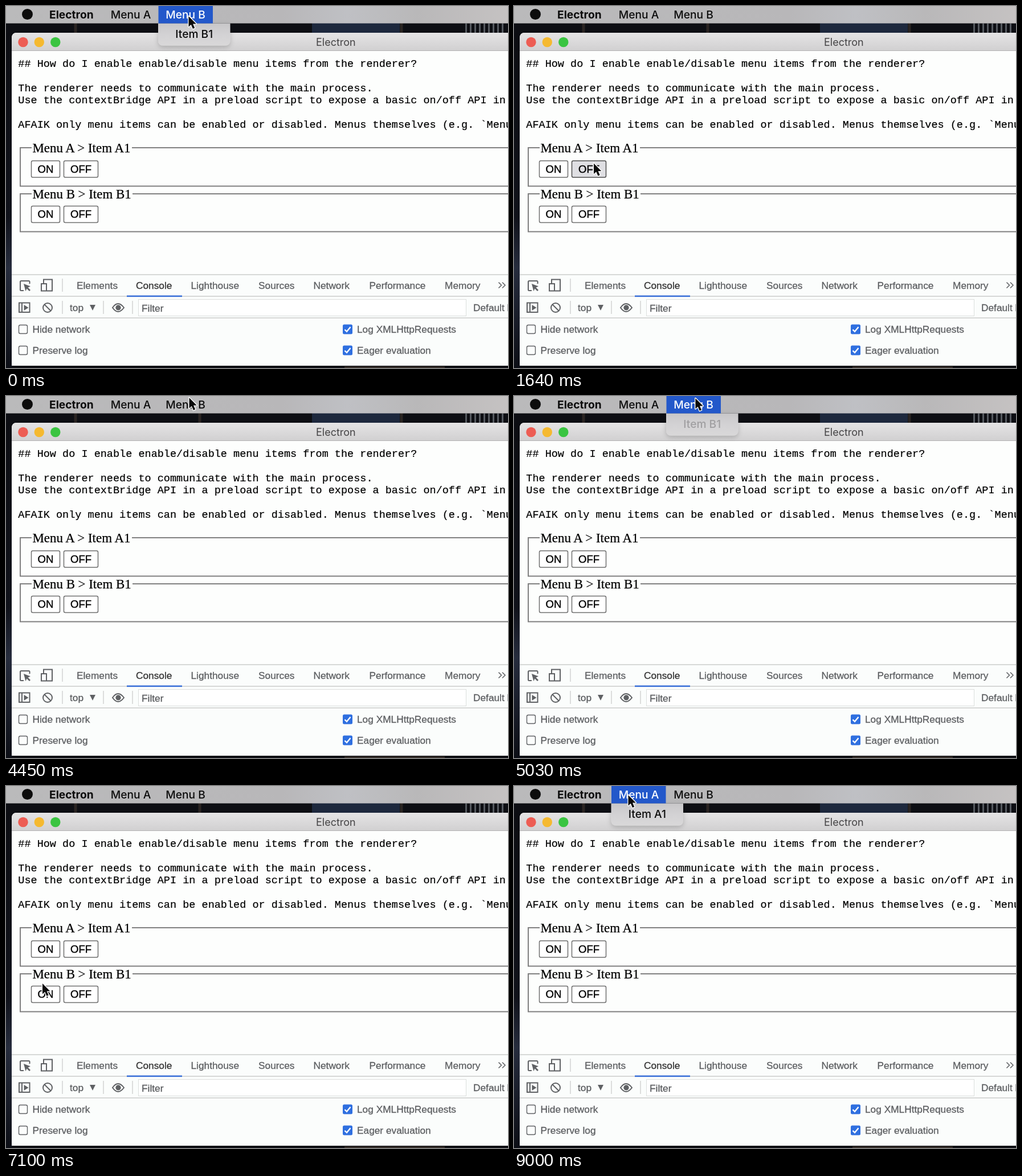
Write an HTML page that moves like this. It is 881 px wide and 636 px high and loops after 9.1 s.

```html
<!DOCTYPE html>
<html lang="en">
<head>
<meta charset="utf-8">
<title>Menu items</title>
<style>
  html, body { margin: 0; width: 100%; height: 100%; overflow: hidden; background: #0d0e13; }
  svg { display: block; width: 881px; height: 636px; }
  text { white-space: pre; }
  .bar { font: 500 19.2px Inter, sans-serif; fill: #0c0c0c; }
  .bold { font-weight: 700; }
  .title { font: 18px Inter, sans-serif; fill: #454446; }
  .mono { font: 18.53px "Liberation Mono", monospace; fill: #000; stroke: #000; stroke-width: .2; }
  .legend { font: 22.9px "Liberation Serif", serif; font-kerning: normal; fill: #000; stroke: #000; stroke-width: .25; }
  .tool { font: 17.3px "Liberation Sans", sans-serif; fill: #5c5e61; stroke: #5c5e61; stroke-width: .3; }
  .tool .active { fill: #333; stroke: #333; }
  .btn rect { fill: #fff; stroke: #6f6f6f; stroke-width: 1.5; }
  .btn text { font: 18.53px "Liberation Sans", sans-serif; text-anchor: middle; stroke: #000; stroke-width: .4; }
  .btn.hover rect { fill: #dfdfe3; stroke: #4e4e4e; }
  .icon { fill: none; stroke: #5f6164; stroke-width: 2; }
  .solid { fill: #5f6164; stroke: none; }
  .line { stroke: #cbcdcc; stroke-width: 1.3; }
  .menu .drop { display: none; }
  .menu.open .drop { display: inline; }
  .menu .lit { fill: none; }
  .menu.open .lit { fill: #2358ca; }
  .menu.open .name { fill: #fff; }
  .menu.off .item { fill: #a09fa1; }
  .field { fill: none; stroke: #808080; stroke-width: 2; }
</style>
</head>
<body>
<svg viewBox="0 0 881 636">
  <defs>
    <linearGradient id="barFill">
      <stop offset="0" stop-color="#bababb"/>
      <stop offset=".55" stop-color="#b8b7b9"/>
      <stop offset=".68" stop-color="#bfc0c4"/>
      <stop offset=".82" stop-color="#b9b8b9"/>
      <stop offset="1" stop-color="#c5c2c2"/>
    </linearGradient>
    <linearGradient id="titleFill" x2="0" y2="1">
      <stop offset="0" stop-color="#e5e4e5"/>
      <stop offset="1" stop-color="#d1d0d1"/>
    </linearGradient>
    <linearGradient id="dropFill" x2="0" y2="1">
      <stop offset="0" stop-color="#c8c7c9"/>
      <stop offset=".5" stop-color="#d3d2d4"/>
      <stop offset="1" stop-color="#d9d8d9"/>
    </linearGradient>
    <linearGradient id="edgeFill" x2="0" y2="1">
      <stop offset="0" stop-color="#0c0d12"/>
      <stop offset=".55" stop-color="#10121a"/>
      <stop offset=".7" stop-color="#262c3d"/>
      <stop offset="1" stop-color="#0c0e15"/>
    </linearGradient>
    <filter id="soft" x="-20%" y="-20%" width="140%" height="160%">
      <feDropShadow dx="0" dy="3" stdDeviation="4" flood-opacity=".2"/>
    </filter>
  </defs>

  <!-- desktop -->
  <rect width="881" height="636" fill="#0d0e13"/>
  <rect y="48" width="11" height="588" fill="url(#edgeFill)"/>
  <rect x="537" y="30" width="154" height="18" fill="#1d283d"/>
  <path d="M122 30v18M340 30v18M694 30v18" stroke="#2a2422" stroke-width="5"/>
  <path d="M806 39H874" stroke="#565a60" stroke-width="17" stroke-dasharray="3 5"/>
  <path d="M594 634.5H770" stroke="#41362f" stroke-width="2"/>

  <!-- window -->
  <path d="M10 632V56q0-9 9-9H881V632Z" fill="#fdfefd"/>
  <path d="M10 78V56q0-9 9-9H881V78Z" fill="url(#titleFill)"/>
  <path d="M10 78.5H881" stroke="#b3b2b3"/>
  <circle cx="30" cy="63.5" r="8.7" fill="#ed5d54"/>
  <circle cx="58.3" cy="63.5" r="8.7" fill="#f5b930"/>
  <circle cx="86.8" cy="63.5" r="8.7" fill="#3ac441"/>
  <text class="title" x="544" y="70">Electron</text>

  <g class="mono">
    <text x="21.3" y="107">## How do I enable enable/disable menu items from the renderer?</text>
    <text x="21.3" y="150">The renderer needs to communicate with the main process.</text>
    <text x="21.3" y="171.4">Use the contextBridge API in a preload script to expose a basic on/off API in</text>
    <text x="21.3" y="214">AFAIK only menu items can be enabled or disabled. Menus themselves (e.g. `Menu A`)</text>
  </g>

  <path class="field" d="M45 249H25V316.500H890M221 249H890"/>
  <path class="field" d="M45 330H25V396.500H890M222 330H890"/>
  <text class="legend" x="46.5" y="257">Menu A &gt; Item A1</text>
  <text class="legend" x="46.5" y="338">Menu B &gt; Item B1</text>
  <g id="buttons"></g>

  <!-- developer tools -->
  <rect x="10" y="472" width="871" height="160" fill="#fbfdfc"/>
  <path class="line" d="M10 472H881M10 510H881M10 548H881M99 479V502M99 518V541M171 518V541M222 518V541"/>
  <rect x="212" y="508.5" width="97" height="2.6" fill="#3a70d8"/>
  <rect x="232.5" y="515.5" width="575" height="29" fill="#fff" stroke="#dcdedd"/>

  <g class="icon">
    <path d="M31 500H26.500q-1.500 0-1.500-1.500V484.500q0-1.500 1.500-1.500H40q1.500 0 1.500 1.500V488"/>
    <path class="solid" d="M31 488l12 4.500-4.500 2 4.500 4.500-2 2-4.500-4.500-2 4.500Z"/>
    <path d="M66 487V480.500H81V500.500H72"/>
    <rect x="62" y="488" width="9" height="12.500"/>
    <rect x="23" y="521.500" width="18.500" height="16.500"/>
    <path d="M28 521V538"/>
    <path class="solid" d="M31.500 525l8 5-8 5Z"/>
    <circle cx="73" cy="530" r="8"/>
    <path d="M67.500 524.500l11 11"/>
    <path class="solid" d="M147 525H157L152 535Z"/>
    <path d="M187 530q9.500-14 20 0q-10.500 14-20 0Z"/>
    <circle class="solid" cx="197" cy="530" r="4.700"/>
    <path d="M864.500 485.500l5 5-5 5M871 485.500l5 5-5 5" stroke-width="1.500"/>
    <rect x="22.500" y="560.500" width="15" height="15" rx="2.500" stroke-width="1.400"/>
    <rect x="22.500" y="597.500" width="15" height="15" rx="2.500" stroke-width="1.400"/>
  </g>
  <rect x="591" y="559.5" width="17" height="17" rx="2.5" fill="#2f6fe0"/>
  <rect x="591" y="596.5" width="17" height="17" rx="2.5" fill="#2f6fe0"/>
  <path d="M594.5 568.500l3.500 3.500 6.500-8M594.500 605.500l3.500 3.500 6.500-8" fill="none" stroke="#fff" stroke-width="2.4"/>

  <g class="tool">
    <text x="124" y="496.500">Elements</text>
    <text class="active" x="228" y="496.500">Console</text>
    <text x="324.500" y="496.500">Lighthouse</text>
    <text x="443" y="496.500">Sources</text>
    <text x="539.500" y="496.500">Network</text>
    <text x="637.500" y="496.500">Performance</text>
    <text x="770" y="496.500">Memory</text>
    <text x="112" y="535.500">top</text>
    <text x="238" y="536.500">Filter</text>
    <text x="820" y="535.500">Default levels</text>
    <text x="46.500" y="573.500">Hide network</text>
    <text x="46.500" y="610.500">Preserve log</text>
    <text x="616" y="573.500">Log XMLHttpRequests</text>
    <text x="616" y="610.500">Eager evaluation</text>
  </g>

  <!-- menu bar -->
  <rect width="881" height="30.5" fill="url(#barFill)"/>
  <circle cx="37.5" cy="14.5" r="9.500" fill="#0c0c0c"/>
  <text class="bar bold" x="76" y="22">Electron</text>
  <g id="menus"></g>

  <!-- pointer -->
  <g id="pointer">
    <g id="ring" fill="none">
      <circle r="28.5" stroke="#fff" stroke-width="6"/>
      <circle r="28.5" stroke="#0a0a0a" stroke-width="3.800"/>
    </g>
    <path d="M0 0V18.500L4.300 14.700L7.400 22L10.700 20.500L7.600 13.500H13.300Z" fill="#0a0a0a" stroke="#fff" stroke-width="2.600" stroke-linejoin="round" paint-order="stroke"/>
  </g>
</svg>
<script>
  const LOOP = 9100, STEP = 148.14;
  const $ = id => document.getElementById(id);

  // Pointer tip: time, x, y
  const path = [
    [0, 320.5, 18], [450, 320.5, 18], [700, 324, 20], [1040, 321, 18], [1190, 321, 18],
    [1600, 140, 276.5], [2220, 140, 276.5], [2900, 124, 352], [3720, 124, 352],
    [4430, 321.5, 3], [5000, 321.5, 4], [5330, 231, 5], [5930, 231, 5],
    [6480, 68, 278], [6670, 68, 278], [7100, 64, 347], [7250, 66, 354],
    [7860, 66, 354], [8440, 201, 14], [8740, 200.5, 16], [LOOP, 200.5, 16]
  ];
  const clicks = [1180, 1900, 3100, 4580, 5770, 6500, 7690, 8440];
  const CLICK = 148;
  const menus = [
    { key: 'A', x: 171, open: [[5180, 5920], [8440, LOOP]], off: [1900, 6500] },
    { key: 'B', x: 267.5, open: [[0, 1180], [4580, 5180]], off: [3100, 7690] }
  ];
  const buttons = [
    { x: 44.5, y: 272, w: 50, label: 'ON' }, { x: 101.5, y: 272, w: 60, label: 'OFF' },
    { x: 44.5, y: 351.5, w: 50, label: 'ON' }, { x: 101.5, y: 351.5, w: 60, label: 'OFF' }
  ];
  const BTN_H = 29;

  $('buttons').innerHTML = buttons.map(b => `<g class="btn">
    <rect x="${b.x}" y="${b.y}" width="${b.w}" height="${BTN_H}" rx="2.5"/>
    <text x="${b.x + b.w / 2}" y="${b.y + 20.5}">${b.label}</text></g>`).join('');

  $('menus').innerHTML = menus.map(m => `<g class="menu">
    <path class="drop" d="M${m.x - .5} 30.5h126.500v30q0 9-9 9h-108.500q-9 0-9-9Z" fill="url(#dropFill)" filter="url(#soft)"/>
    <rect class="lit" x="${m.x}" width="95.5" height="30.5"/>
    <text class="bar name" x="${m.x + 12.8}" y="22">Menu ${m.key}</text>
    <text class="bar drop item" x="${m.x + 29.8}" y="56">Item ${m.key}1</text></g>`).join('');

  const buttonEls = [...$('buttons').children];
  const menuEls = [...$('menus').children];
  const within = (t, [a, b]) => t >= a && t < b;

  function tipAt(t) {
    const i = path.findIndex(p => p[0] > t);
    const [t0, x0, y0] = path[i - 1], [t1, x1, y1] = path[i];
    const u = (t - t0) / (t1 - t0), e = u * u * (3 - 2 * u);
    return [x0 + (x1 - x0) * e, y0 + (y1 - y0) * e];
  }

  function draw(now) {
    const t = Math.floor((now % LOOP + 13) / STEP) * STEP;
    const [x, y] = tipAt(t);
    $('pointer').setAttribute('transform', `translate(${x} ${y})`);
    $('ring').style.display = clicks.some(c => within(t, [c, c + CLICK])) ? 'inline' : 'none';
    buttons.forEach((b, i) => buttonEls[i].classList.toggle('hover',
      x >= b.x && x <= b.x + b.w && y >= b.y && y <= b.y + BTN_H));
    menus.forEach((m, i) => {
      menuEls[i].classList.toggle('open', m.open.some(span => within(t, span)));
      menuEls[i].classList.toggle('off', within(t, m.off));
    });
  }

  const start = performance.now();
  function tick() {
    draw(performance.now() - start);
    requestAnimationFrame(tick);
  }
  tick();
</script>
</body>
</html>
```
